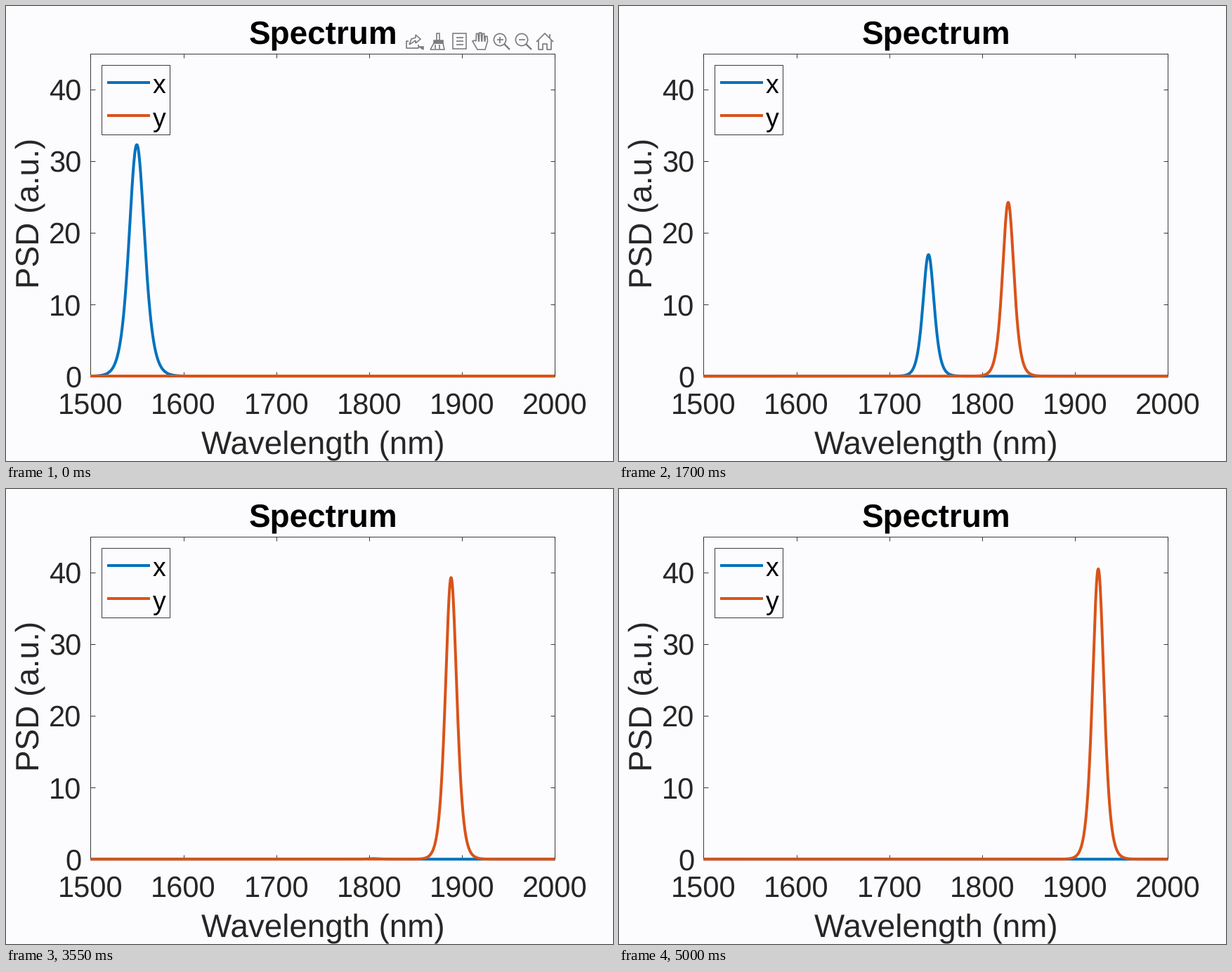
These frames come from a looping animation (864x648 px, 5050 ms). A matplotlib script:

```python
import numpy as np
import matplotlib.pyplot as plt
from matplotlib.animation import FuncAnimation
from matplotlib.patches import Circle, Polygon, Rectangle

W, H, DPI = 864, 648, 72          # at 72 dpi one point is one pixel
FRAMES, INTERVAL = 101, 50
LEFT, RIGHT, TOP, BOTTOM = 120.4, 781.4, 67.8, 527.2
NM_PX = (RIGHT - LEFT) / 500
UNIT_PX = (BOTTOM - TOP) / 45
BLUE, ORANGE = "#0072bd", "#d95319"
INK, PAPER, ICON = "#262626", "#fcfcfe", "#7c7c7c"
THIN, THICK = 0.9, 4

plt.rcParams["font.family"] = "Liberation Sans"
plt.rcParams["text.hinting"] = "none"

fig = plt.figure(figsize=(W / DPI, H / DPI), dpi=DPI, facecolor=PAPER)
ax = fig.add_axes([0, 0, 1, 1])
ax.set_xlim(0, W)
ax.set_ylim(H, 0)
ax.axis("off")

nm = np.linspace(1500, 2000, 1001)


def px(wavelength):
    return LEFT + (wavelength - 1500) * NM_PX


def py(value):
    return BOTTOM - value * UNIT_PX


def pulse(center, height, width):
    """Squared hyperbolic secant in optical frequency."""
    u = center * (1 - center / nm) / width
    return py(height / np.cosh(u) ** 2)


def center_x(t):
    """Fast red shift that settles into a slow drift with a slight wobble."""
    drift = 1.7 * t - 0.0018 * t * t
    wobble = 1.8 * np.sin(2 * np.pi * (t - 34) / 60)
    return 1550.5 + 141 * (1 - np.exp(-t / 10.2)) + drift - wobble


def center_y(t):
    return center_x(t) + 87.5 - 0.05 * t


def share(t):
    """Part of the energy that has moved from x to y."""
    def logistic(s):
        return 1 / (1 + np.exp(-0.16 * (s - 31.7)))
    return (logistic(t) - logistic(0)) / (1 - logistic(0))


def heights(t):
    s = share(t)
    total = 32.3 + 4.2 * s + 0.04 * t + 21 * s * (1 - s)
    return total * (1 - s), total * s


def width_x(t):
    return 7.5 + 3.7 * np.exp(-t / 18)


WIDTH_Y = 8.2


def stroke(xs, ys, color=INK, lw=THIN, zorder=1):
    return ax.plot(xs, ys, color=color, lw=lw, zorder=zorder, solid_capstyle="butt")[0]


def frame(x, y, w, h, zorder=1):
    ax.add_patch(Rectangle((x, y), w, h, fc=PAPER, ec=INK, lw=THIN, zorder=zorder))


def label(x, y, s, size, color=INK, **kw):
    ax.text(x, y, s, fontsize=size, color=color, ha="left", va="baseline", **kw)


def draw_axes():
    tick, size = 6.6, 41.67
    digit = 0.556 * size
    frame(LEFT, TOP, RIGHT - LEFT, BOTTOM - TOP)
    for wavelength in range(1500, 2001, 100):
        x = px(wavelength)
        stroke([x, x], [BOTTOM, BOTTOM - tick])
        stroke([x, x], [TOP, TOP + tick])
        label(x - 2 * digit, 581, str(wavelength), size)
    for value in range(0, 50, 10):
        y = py(value)
        stroke([LEFT, LEFT + tick], [y, y])
        stroke([RIGHT, RIGHT - tick], [y, y])
        label(107.3 - digit * len(str(value)), y + 15, str(value), size)
    label(345.6, 53.5, "Spectrum", 45.83, "black", weight="bold")
    label(277.5, 637, "Wavelength (nm)", 45.7)
    label(46.5, 402, "PSD (a.u.)", 45.83, rotation=90, rotation_mode="anchor")


def draw_legend():
    frame(136.4, 83.8, 97, 99, zorder=5)
    for y, name, color in ((109, "x", BLUE), (156, "y", ORANGE)):
        stroke([144, 205], [y, y], color, THICK, zorder=6)
        label(209, y + 15.2, name, 37.5, "black", zorder=6)


def draw_toolbar():
    parts = []

    def pen(*pts, lw=1.7):
        xs, ys = zip(*pts)
        parts.append(stroke(xs, ys, ICON, lw))

    def shape(*pts, fill=False):
        parts.append(ax.add_patch(Polygon(pts, fill=fill, fc=ICON, ec=ICON, lw=1.6)))

    def box(x0, y0, x1, y1, fill=False):
        shape((x0, y0), (x1, y0), (x1, y1), (x0, y1), fill=fill)

    # export
    pen((573, 50), (570, 50), (570, 60), (587, 60), (587, 55))
    shape((574, 55), (577, 47), (583, 45), (583, 41), (590, 47), (583, 53), (583, 49))
    shape((588, 58), (594, 58), (594, 62), fill=True)
    # brush
    box(613, 39, 617, 49)
    box(609, 49, 622, 53, fill=True)
    shape((609, 53), (622, 53), (624, 62), (604, 62))
    for x in (611, 617):
        pen((x, 55), (x, 61))
    # data tip
    box(636, 39, 655, 61)
    for y in (45, 50, 55):
        pen((641, y), (651, y))
    # hand
    fingers = []
    for k in range(4):
        x, top = 669 + 4.3 * k, 38 + 1.3 * (k - 1) ** 2
        fingers += [(x, 50), (x + 0.5, top), (x + 3, top), (x + 3.6, 50)]
    shape((671, 62), (664, 50), (667, 49), *fingers, (682, 62))
    # zoom in and out
    for x in (703, 734):
        parts.append(ax.add_patch(Circle((x, 48), 8.6, fill=False, ec=ICON, lw=1.7)))
        pen((x + 6.2, 54.2), (x + 14, 62), lw=2.4)
        pen((x - 4.5, 48), (x + 4.5, 48))
    pen((703, 43.5), (703, 52.5))
    # home
    pen((755, 51), (767, 39), (779, 51))
    pen((758, 49), (758, 62), (764, 62), (764, 54), (770, 54), (770, 62), (776, 62), (776, 49))
    pen((774, 45), (774, 40))
    return parts


draw_axes()
draw_legend()
toolbar = draw_toolbar()
flat = np.full(nm.size, BOTTOM)
line_x = stroke(px(nm), flat, BLUE, THICK, zorder=3)
line_y = stroke(px(nm), flat, ORANGE, THICK, zorder=4)


def update(t):
    height_x, height_y = heights(t)
    line_x.set_ydata(pulse(center_x(t), height_x, width_x(t)))
    line_y.set_ydata(pulse(center_y(t), height_y, WIDTH_Y))
    for part in toolbar:
        part.set_visible(t == 0)
    return [line_x, line_y, *toolbar]


anim = FuncAnimation(fig, update, frames=FRAMES, interval=INTERVAL,
                     init_func=lambda: update(0), repeat=True, repeat_delay=0)
plt.show()
```
